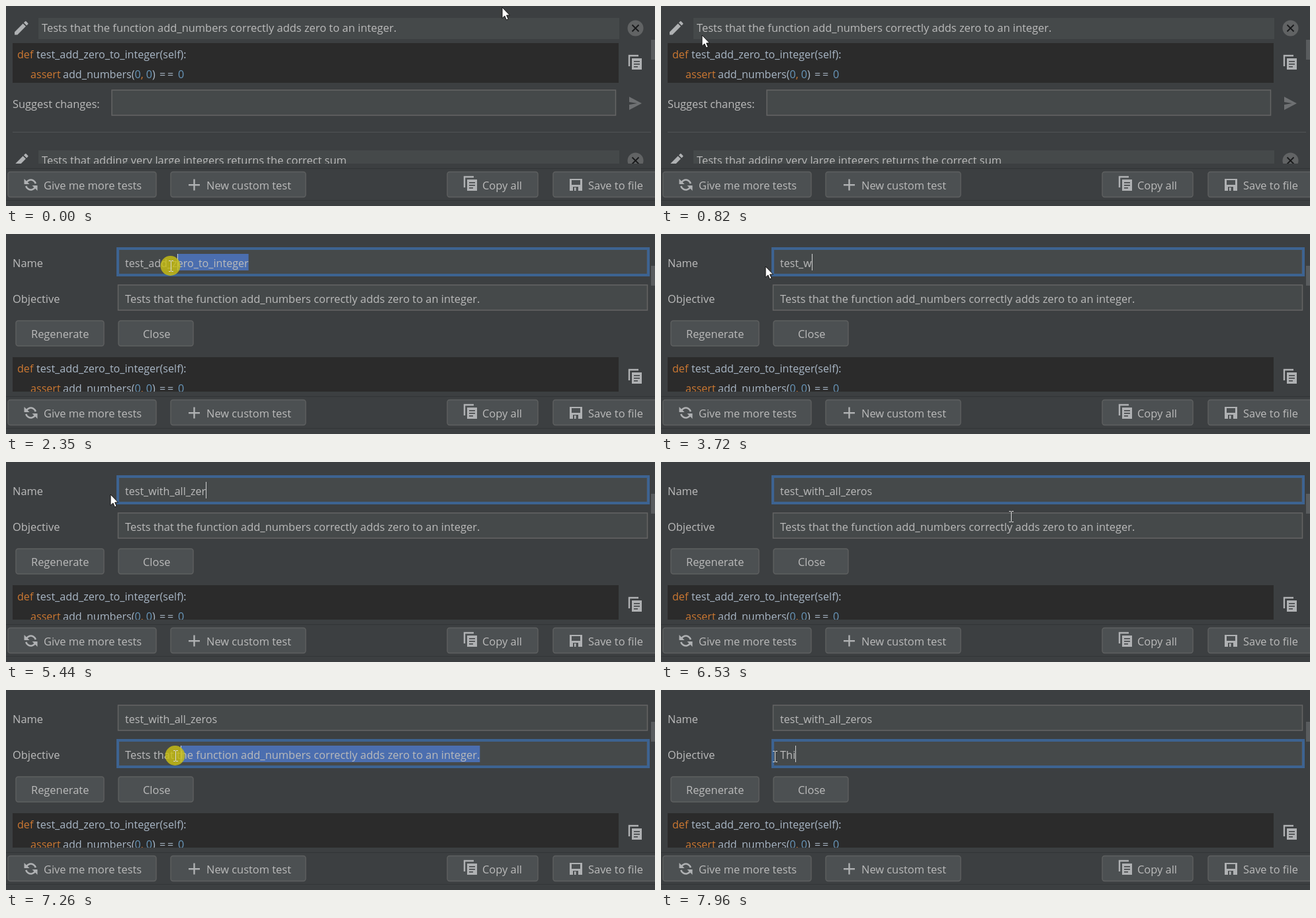
Recreate the animation shown at these times as an HTML page with a canvas. Size 981x302 px, loop 8000 ms.

```html
<!DOCTYPE html>
<html lang="en">
<head>
<meta charset="utf-8">
<title>Test editor</title>
<style>
html, body { margin: 0; width: 100%; height: 100%; overflow: hidden; background: #3c3f41; }
canvas { display: block; }
</style>
</head>
<body>
<canvas id="stage" width="981" height="302"></canvas>
<script>
const ctx = document.getElementById('stage').getContext('2d');
const LOOP = 8000;
const BG = '#3c3f41', FIELD = '#45494a', TEXT = '#bbbbbb', ICON = '#afb1b3';
const FAMILY = '"Open Sans", "Noto Sans", sans-serif';
const UI = '16.43px ' + FAMILY, CODE = '16.1px ' + FAMILY;
const OPEN_AT = 1150;
const OLD_NAME = 'test_add_zero_to_integer', NEW_NAME = 'test_with_all_zeros';
const GOAL = 'Tests that the function add_numbers correctly adds zero to an integer.';

// moment each character appears
const NAME_KEYS = [3040, 3120, 3200, 3290, 3540, 3720, 4010, 4010, 4010, 4300,
  4520, 4680, 4760, 5010, 5190, 5330, 5440, 5540, 5640];
const GOAL_KEYS = [7760, 7860, 7960];
// mouse button held down
const PRESSES = [[980, 1150], [2240, 2700], [6840, 7400]];
// time, x, y, linear
const MOVES = [
  [110, 750, 2], [900, 42, 45], [980, 17, 38], [1410, 17, 38], [2170, 386, 43],
  [2240, 386, 44], [2350, 249, 48, 1], [2540, 158, 49, 1], [6150, 158, 49],
  [6780, 724, 99], [6870, 724, 99], [7000, 579, 99, 1], [7330, 170, 99, 1], [7430, 172, 100]
];

const pencil = new Path2D('M3 17.25V21h3.75L17.81 9.94l-3.75-3.75L3 17.25zM20.71 7.04a1 1 0 0 0 0-1.41l-2.34-2.34a1 1 0 0 0-1.41 0l-1.83 1.83 3.75 3.75 1.83-1.83z');
const arrow = new Path2D('M0 0V16.5L3.8 13L6.4 19L9.2 17.8L6.6 12H11.5Z');

function rect(x, y, w, h, color) {
  ctx.fillStyle = color;
  ctx.fillRect(x, y, w, h);
}

function text(str, x, y, color = TEXT, font = UI) {
  ctx.font = font;
  ctx.fillStyle = color;
  ctx.fillText(str, x, y);
}

function width(str, font) {
  ctx.font = font;
  return ctx.measureText(str).width;
}

function line(points, color, size) {
  ctx.beginPath();
  points.forEach(([x, y]) => ctx.lineTo(x, y));
  ctx.strokeStyle = color;
  ctx.lineWidth = size;
  ctx.stroke();
}

function poly(points, color) {
  ctx.beginPath();
  points.forEach(([x, y]) => ctx.lineTo(x, y));
  ctx.fillStyle = color;
  ctx.fill();
}

function at(x, y, scale, draw) {
  ctx.save();
  ctx.translate(x, y);
  ctx.scale(scale, scale);
  draw();
  ctx.restore();
}

function button(x, y, w, h, label, labelX) {
  ctx.beginPath();
  ctx.roundRect(x + .5, y + .5, w - 1, h - 1, 3.5);
  ctx.fillStyle = '#4c5052';
  ctx.fill();
  ctx.strokeStyle = '#5e6060';
  ctx.lineWidth = 1.4;
  ctx.stroke();
  text(label, labelX, y + 26.5);
}

function copyIcon(x, y) {
  line([[x + 1, y + 17], [x + 1, y + 1], [x + 15, y + 1]], ICON, 2.4);
  rect(x + 5, y + 5, 15, 17, ICON);
  for (const dy of [9, 13, 17]) rect(x + 8, y + dy, dy < 17 ? 9 : 6, 1.5, BG);
}

function box(x, y, w, h) {
  rect(x, y, w, h, FIELD);
  ctx.strokeStyle = '#646464';
  ctx.lineWidth = 1.5;
  ctx.strokeRect(x + .5, y + .5, w - 1, h - 1);
}

function summary(str, y) {
  at(9.6, y + 1.5, 1.14, () => { ctx.fillStyle = ICON; ctx.fill(pencil); });
  rect(49, y, 878, 32, FIELD);
  text(str, 54, y + 21);
  ctx.beginPath();
  ctx.arc(951.5, y + 15.5, 12, 0, 7);
  ctx.fillStyle = '#616364';
  ctx.fill();
  for (const s of [-1, 1])
    line([[946.5, y + 15.5 - 5 * s], [956.5, y + 15.5 + 5 * s]], '#18191a', 1.8);
}

function code(y, h) {
  rect(10, y, 916, h, '#2b2b2b');
  const put = (str, x, row, color = '#a9b7c6') => {
    text(str, x, y + 23 + row * 30, color, CODE);
    return x + ctx.measureText(str).width;
  };
  const keyword = '#cc7832', number = '#6897bb';
  put('def', 17, 0, keyword);
  put(OLD_NAME + '(self):', 46, 0);
  put('assert', 37, 1, keyword);
  let x = put('add_numbers(', 86, 1);
  x = put('0', x, 1, number);
  x = put(', ', x, 1, keyword);
  x = put('0', x, 1, number);
  put(')', x, 1);
  put('=', 232, 1);
  put('=', 244, 1);
  put('0', 260, 1, number);
}

function listView() {
  summary(GOAL, 18);
  code(56, 60);
  copyIcon(941, 74);
  text('Suggest changes:', 10, 153.5);
  box(159.5, 126.5, 762.5, 39);
  poly([[942, 137], [961, 147], [942, 157], [942, 149], [954, 147], [942, 145]], '#6e7072');
  rect(10, 190, 965, 1, '#515355');
  summary('Tests that adding very large integers returns the correct sum', 218);
  rect(975, 51, 6, 30, '#595c5e');
}

function caretIndex(str, x, font) {
  let best = 0, gap = Infinity;
  for (let i = 0; i <= str.length; i++) {
    const d = Math.abs(180 + width(str.slice(0, i), font) - x);
    if (d < gap) { gap = d; best = i; }
  }
  return best;
}

// caret: character index or -1; select: first selected character
function input(y, font, str, { focus, caret = -1, select } = {}) {
  box(169, y - .5, 801, 39);
  if (focus) {
    ctx.strokeStyle = '#3d6391';
    ctx.lineWidth = 4;
    ctx.strokeRect(169, y - 1, 802, 40);
  }
  if (select !== undefined) {
    const from = width(str.slice(0, select), font);
    rect(180 + from, y + 7, width(str, font) - from, 25, '#4b6eaf');
  }
  text(str, 180, y + 26.5, TEXT, font);
  if (caret >= 0)
    rect(Math.round(180 + width(str.slice(0, caret), font)), y + 7, 1, 25, '#d0d0d0');
}

function editable(y, font, before, after, keys, t, x, start, end, blink) {
  const typed = keys.filter(k => k <= t).length;
  const focus = t >= start && t < end;
  const lit = focus && !(t >= blink[0] && t < blink[1]);
  if (typed) {
    input(y, font, after.slice(0, typed), { focus, caret: lit ? typed : -1 });
  } else if (focus) {
    const i = caretIndex(before, x + 7, font);
    input(y, font, before, { focus, caret: lit ? i : -1, select: i });
  } else {
    input(y, font, before);
  }
}

function editView(t, x) {
  text('Name', 10, 49.5);
  text('Objective', 10, 103.5);
  editable(23, CODE, OLD_NAME, NEW_NAME, NAME_KEYS, t, x, 2240, 6840, [5900, 6840]);
  editable(77, UI, GOAL, 'Thi', GOAL_KEYS, t, x, 6840, LOOP, [7580, 7760]);
  button(14.5, 130.5, 134, 39, 'Regenerate', 38);
  button(169.5, 130.5, 114, 39, 'Close', 207);
  code(186, 60);
  copyIcon(941, 204);
  rect(975, 48, 6, 30, '#595c5e');
}

function refreshIcon() {
  for (const turn of [0, Math.PI]) {
    ctx.save();
    ctx.translate(37.5, 270);
    ctx.rotate(turn);
    ctx.scale(-1, 1);
    ctx.beginPath();
    ctx.arc(0, 0, 7.5, Math.PI * 1.08, Math.PI * 1.85);
    ctx.strokeStyle = ICON;
    ctx.lineWidth = 2.6;
    ctx.stroke();
    poly([[10, -9], [10, -1], [2, -1]], ICON);
    ctx.restore();
  }
}

function toolbar() {
  rect(0, 238, 981, 64, BG);
  rect(0, 245, 981, 1, '#323537');
  rect(0, 293, 981, 1, '#323537');
  button(2.5, 250, 225, 39, 'Give me more tests', 57);
  button(248.5, 250, 205, 39, 'New custom test', 303);
  button(666.5, 250, 138, 39, 'Copy all', 720);
  button(826.5, 250, 170, 39, 'Save to file', 880);
  refreshIcon();
  rect(276, 269, 17, 2.4, ICON);
  rect(283.3, 261.5, 2.4, 17, ICON);
  copyIcon(692, 257);
  poly([[852, 261], [871, 261], [871, 279], [852, 279]], ICON);
  rect(855, 263, 13, 7, '#4c5052');
  rect(857, 273, 8, 6, '#4c5052');
  rect(859, 274, 2.5, 5, ICON);
}

function mouseAt(t) {
  let i = MOVES.findIndex(m => m[0] > t);
  if (i === 0) i = 1;
  if (i < 0) i = MOVES.length - 1;
  const [t0, x0, y0] = MOVES[i - 1], [t1, x1, y1, linear] = MOVES[i];
  let p = Math.min(1, Math.max(0, (t - t0) / (t1 - t0)));
  if (!linear) p = p * p * (3 - 2 * p);
  return [x0 + (x1 - x0) * p, y0 + (y1 - y0) * p];
}

function pointer(t, x, y) {
  if (PRESSES.some(([a, b]) => t >= a && t < b)) {
    ctx.beginPath();
    ctx.arc(x, y, 15, 0, 7);
    ctx.fillStyle = 'rgba(200, 190, 20, .82)';
    ctx.fill();
  }
  const overInput = t >= OPEN_AT && x > 168 && (y > 22 && y < 62 || y > 76 && y < 116);
  at(Math.round(x), Math.round(y), 1, () => {
    if (overInput) {
      rect(0, -7, 1, 15, '#d8d8d8');
      for (const dy of [-8, 8]) {
        rect(-3, dy, 3, 1, '#d8d8d8');
        rect(1, dy, 3, 1, '#d8d8d8');
      }
    } else {
      ctx.fillStyle = '#fff';
      ctx.fill(arrow);
      ctx.strokeStyle = '#111';
      ctx.lineWidth = 1;
      ctx.stroke(arrow);
    }
  });
}

function frame() {
  const t = performance.now() % LOOP;
  const [x, y] = mouseAt(t);
  rect(0, 0, 981, 302, BG);
  if (t < OPEN_AT) listView();
  else editView(t, x);
  toolbar();
  pointer(t, x, y);
  requestAnimationFrame(frame);
}
frame();
</script>
</body>
</html>
```
